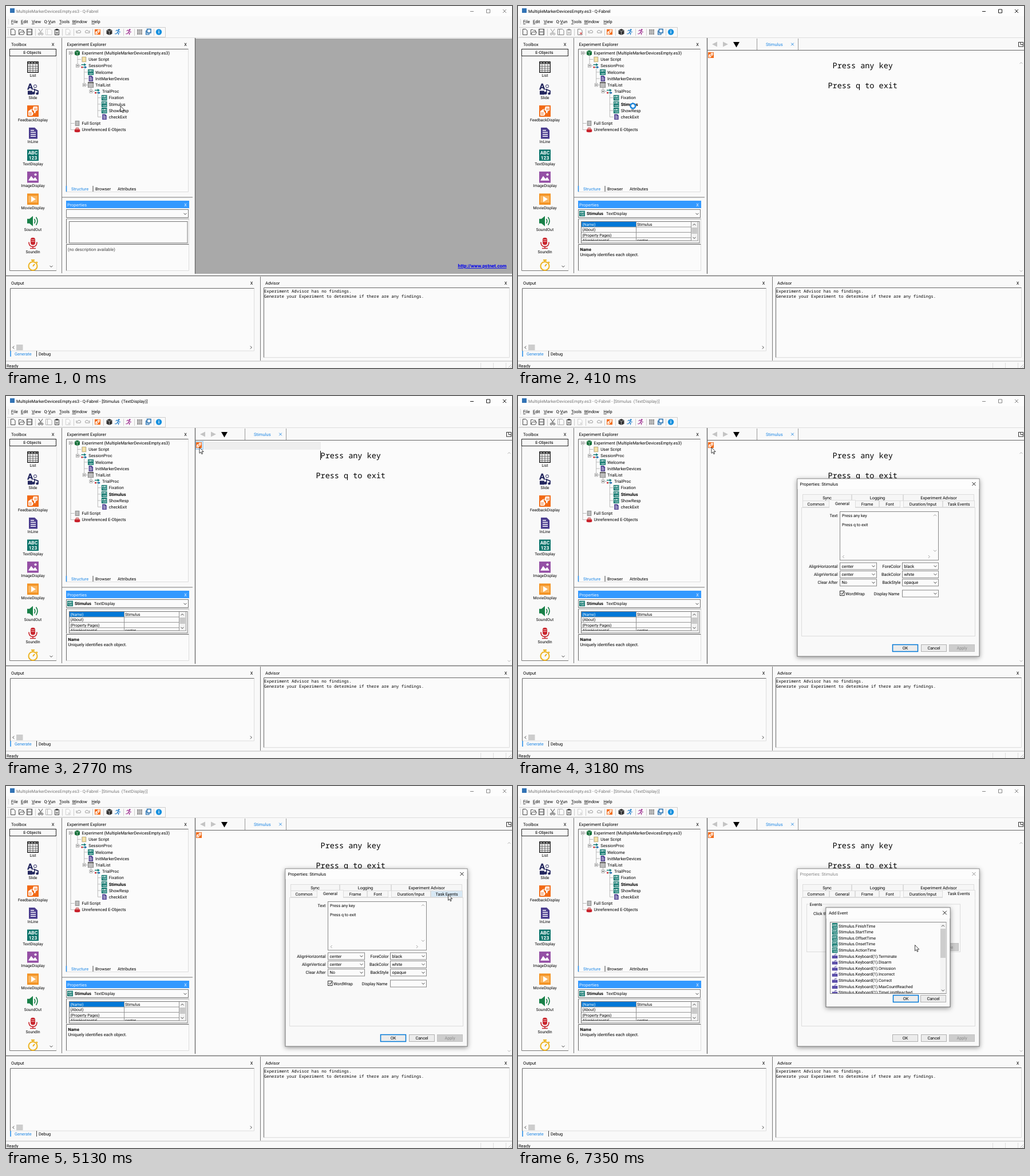
Write an HTML page that moves like this. It is 884x634 px and loops after 8000 ms.

```html
<!DOCTYPE html>
<html lang="en">
<head>
<meta charset="utf-8">
<title>Experiment editor</title>
<style>
  html, body { margin: 0; width: 100%; height: 100%; overflow: hidden; background: #f9f9f9; }
  svg { display: block; width: 884px; height: 634px; }
  text { font-family: Roboto, "Open Sans", sans-serif; text-rendering: geometricPrecision; white-space: pre; }
  .mono { font-family: "Noto Sans Mono", "DejaVu Sans Mono", monospace; }
  .bold { font-weight: 700; }
  .mid { text-anchor: middle; }
  .end { text-anchor: end; }
  .window { filter: drop-shadow(0 2px 4px #0006); }
</style>
</head>
<body>
<svg id="stage" viewBox="0 0 884 634">
<defs>
  <symbol id="list" viewBox="0 0 20 20"><path d="M.7 .7H19.3V19.3H.7Z" fill="#fff" stroke="#222" stroke-width="1.4"/><path d="M0 0H20V4.500H0Z" fill="#333"/><path d="M1 8.500H19M1 12H19M1 15.600H19M5 5V19M10 5V19M15 5V19" stroke="#555" stroke-width=".9"/><path d="M2 2.500H18" stroke="#fff" stroke-dasharray="3 2"/></symbol>
  <symbol id="slide" viewBox="0 0 20 20" fill="#25285f"><path d="M0 11 4 0H6.500L10.500 11H7.800L7 8.500H3.500L2.700 11ZM4.200 6.500H6.300L5.200 3Z"/><path d="M1 13H9V20H1Z"/><circle cx="14" cy="5" r="2.600" fill="none" stroke="#25285f"/><path d="M11 10 19 13V18" fill="none" stroke="#25285f" stroke-width="1.800"/><circle cx="11" cy="17" r="2.500"/><circle cx="17.500" cy="18" r="2.300"/><path d="M12 10H13.500V17H12Z"/></symbol>
  <symbol id="feedback" viewBox="0 0 20 20"><path d="M0 0H20V20H0Z" fill="#f26a16"/><path d="M2 10V18H9L11 14 8 10 8 6 5 8ZM11 2H18V9L15 10 14 14 12 13V10L9 8Z" fill="#fff"/><path d="M3 13H8M3 15.500H8M12 5H17M12 7.500H17" stroke="#f26a16"/></symbol>
  <symbol id="inline" viewBox="0 0 20 20"><path d="M3 0H13L18 5V20H3Z" fill="#4b3d8f"/><path d="M6 5H12M6 8.500H15M6 12H15M6 15.500H15" stroke="#fff" stroke-width="1.500"/></symbol>
  <symbol id="textd" viewBox="0 0 20 20"><path d="M0 0H20V20H0Z" fill="#08736a"/><text class="bold mid" x="10" y="9" font-size="8.500" fill="#fff">ABC</text><text class="bold mid" x="10" y="17.500" font-size="8.500" fill="#fff">123</text></symbol>
  <symbol id="image" viewBox="0 0 20 20"><path d="M0 0H20V20H0Z" fill="#9550a5"/><path d="M2 16 7 8 11 13 14 10 18 16Z" fill="#fff"/><circle cx="14.500" cy="5.500" r="2" fill="#fff"/></symbol>
  <symbol id="movie" viewBox="0 0 20 20"><path d="M0 0H20V20H0Z" fill="#f39324"/><path d="M2 4H18V16H2Z" fill="#fbb65f"/><path d="M7 5 15 10 7 15Z" fill="#fff"/></symbol>
  <symbol id="sound" viewBox="0 0 20 20"><path d="M0 6H4L10 1V19L4 14H0Z" fill="#188048"/><path d="M12.500 6Q15 10 12.500 14M15.500 3Q20.500 10 15.500 17" fill="none" stroke="#188048" stroke-width="1.700"/></symbol>
  <symbol id="mic" viewBox="0 0 20 20" fill="none" stroke="#c9252d" stroke-width="1.700"><rect x="6" y="0" width="8" height="13" rx="4" fill="#c9252d" stroke="none"/><path d="M3 8Q3 16 10 16T17 8M10 16V19M5 19.200H15"/><path d="M7 4H13M7 7H13" stroke="#fff" stroke-width=".7"/></symbol>
  <symbol id="wait" viewBox="0 0 20 20" fill="none" stroke="#edb21b" stroke-width="2"><circle cx="10" cy="11.500" r="7.500"/><path d="M7 1H13M10 1V4M10 12 13 8M16 4 18 6"/></symbol>
  <symbol id="cube" viewBox="0 0 20 20"><path d="M1 4 10 0 19 4V16L10 20 1 16Z" fill="currentColor"/><path d="M1 4 10 8 19 4M10 8V20" fill="none" stroke="#fff"/></symbol>
  <symbol id="script" viewBox="0 0 20 20"><path d="M3 1H17V19H3Z" fill="currentColor" stroke="#777"/><path d="M6 6H14M6 10H14M6 14H14" stroke="#fff"/></symbol>
  <symbol id="proc" viewBox="0 0 20 20"><path d="M0 6H11M7 15H14" stroke="#117a78" stroke-width="3"/><path d="M10 1 18 6 10 11Z" fill="#117a78"/><path d="M13 10 20 15 13 20Z" fill="#1b66b0"/><circle cx="3" cy="15" r="3" fill="#c9252d"/></symbol>
  <symbol id="bin" viewBox="0 0 20 20"><path d="M0 9H20V17Q10 21 0 17Z" fill="#c8202a"/><path d="M3 9 6 3H14L17 9Z" fill="#e9a0a0" stroke="#a11"/></symbol>
  <symbol id="keys" viewBox="0 0 20 20"><path d="M0 8H20V18H0Z" fill="#4b3d9f"/><path d="M10 8V4H15V1" fill="none" stroke="#4b3d9f" stroke-width="1.500"/><path d="M2 11H18M4 15H16" stroke="#b7b0e0" stroke-dasharray="2 1"/></symbol>
  <symbol id="runner" viewBox="0 0 20 20" fill="none" stroke="currentColor" stroke-width="2"><circle cx="14" cy="3" r="1.500" fill="currentColor"/><path d="M4 7 8 4 12 6 9 12 14 14 12 19M9 12 6 16H1M12 7 15 10H19"/></symbol>
</defs>
</svg>
<script>
const LOOP = 8000, INK = '#000', BLUE = '#1e87e5', PAPER = '#fbfbfb', FACE = '#f9f9f9';

const rect = (x1, y1, x2, y2, fill = 'none', stroke = 'none', w = 1) =>
  `<rect x="${x1}" y="${y1}" width="${x2 - x1}" height="${y2 - y1}" fill="${fill}" stroke="${stroke}" stroke-width="${w}"/>`;
const line = (d, stroke = '#666', w = 1, more = '') =>
  `<path d="${d}" fill="none" stroke="${stroke}" stroke-width="${w}" ${more}/>`;
const shape = (d, fill) => `<path d="${d}" fill="${fill}"/>`;
// Text is placed by the vertical centre of its capitals.
const text = (x, cy, str, size = 7.4, cls = '', fill = INK, more = '') =>
  `<text x="${x}" y="${(cy + size * .36).toFixed(2)}" font-size="${size}" class="${cls}" fill="${fill}" ${more}>${str}</text>`;
const icon = (id, cx, cy, size = 10, color = INK) =>
  `<use href="#${id}" x="${cx - size / 2}" y="${cy - size / 2}" width="${size}" height="${size}" color="${color}"/>`;
const span = (from, to, ...parts) => `<g data-from="${from}" data-to="${to}">${parts.join('')}</g>`;
const cross = (x, y, r = 3.3, color = INK) =>
  line(`M${x - r} ${y - r}L${x + r} ${y + r}M${x + r} ${y - r}L${x - r} ${y + r}`, color, .9);
const chevron = (x, y, angle = 0, color = '#333') =>
  line('M-2.500 -1.200 0 1.300 2.500 -1.200', color, .9, `transform="translate(${x} ${y}) rotate(${angle})"`);
const sunken = (x1, y1, x2, y2) =>
  rect(x1, y1, x2, y2, PAPER) + line(`M${x1} ${y2}H${x2}V${y1}`, '#ddd') + line(`M${x1} ${y2}V${y1}H${x2}`, '#666');
const button = (x1, y1, x2, y2, label, kind = '') => {
  const [fill, stroke, w] = {
    main: ['#ececec', '#0078d7', 1.5], off: ['#cdcdcd', '#c2c2c2', 1],
    hot: ['#e1eef9', '#0078d7', 1], down: ['#cce4f7', '#005499', 1]
  }[kind] || ['#ececec', '#b0b0b0', 1];
  return rect(x1 + .5, y1 + .5, x2 - .5, y2 - .5, fill, stroke, w) +
    text((x1 + x2) / 2, (y1 + y2) / 2 + .3, label, 7.3, 'mid', kind == 'off' ? '#8c8c8c' : INK);
};
const combo = (x1, x2, cy, value = '') =>
  rect(x1 + .5, cy - 6, x2 - .5, cy + 6, PAPER, '#888') + text(x1 + 3.5, cy, value) + chevron(x2 - 6, cy);

function titleBar() {
  const file = 'MultipleMarkerDevicesEmpty.es3 - Q-Fabrel';
  const open = file + ' - [Stimulus\u00a0 (TextDisplay)]';
  const head = (str, color) => text(18, 9, str, 7.45, '', color) +
    line('M811 9.500H817M839.500 6H845.500V12H839.500Z', color, .9) + cross(871, 9, 3, color);
  const menu = [['File', 9], ['Edit', 26], ['View', 45], ['Q-Vun', 66.5], ['Tools', 93], ['Window', 115.5], ['Help', 149.5]];
  return rect(0, 0, 884, 18, '#fdfdfd') + rect(7, 4, 15, 12, '#3273b5') +
    span(0, 280, head(file, '#777')) + span(280, 550, head(file, INK)) +
    span(550, 3180, head(open, INK)) + span(3180, LOOP, head(open, '#777')) +
    menu.map(([name, x]) => {
      const key = name.includes('-') ? 2 : 0;
      return text(x, 27.3, name.slice(0, key) + `<tspan text-decoration="underline">${name[key]}</tspan>` + name.slice(key + 1));
    }).join('') + line('M4.500 23V32M4.500 40V51', '#bbb', 1, 'stroke-dasharray="1 1"');
}

function toolbar() {
  const sheet = (x, color, fill = PAPER) => line(`M${x - 3.5} 40.500H${x + 1.5}L${x + 4} 43V50.500H${x - 3.5}Z`, color, .9, `style="fill:${fill}"`);
  const cut = c => line('M57 40 62 48M64 40 59 48', c) +
    `<circle cx="58" cy="49" r="1.700" fill="none" stroke="${c}"/><circle cx="63" cy="49" r="1.700" fill="none" stroke="${c}"/>`;
  const copy = c => sheet(73, c) + sheet(76, c);
  const paste = c => rect(85.5, 41.5, 92.5, 50.5, PAPER, c) + rect(87, 40, 91, 43, c) + line('M87 46H91M87 48H91', c);
  const remove = (c, x) => sheet(108, c) + cross(110, 48, 2, x);
  const edit = (a, b, c, d, x) => cut(a) + copy(b) + paste(c) + remove(d, x);
  const curl = (x, s) => line(`M${x - 4 * s} 47H${x + 3 * s}Q${x + 5 * s} 43 ${x} 42.500L${x - 3 * s} 45M${x - 4 * s} 43V47`, '#999');
  return line('M2 37.500H278.500V54.500H2', '#ccc') + line('M0 55.500H884', '#ddd') +
    [51.5, 98.5, 118.5, 151.5, 170.5, 205.5, 224.5, 258.5].map(x => line(`M${x} 40V52`, '#ccc')).join('') +
    sheet(12, '#333') +
    line('M22.500 50V41.500H26L27 42.500H30.500V45M22.500 50 25 45.500H32.500L30.500 50Z', '#444', .9) +
    rect(36.5, 40.5, 45.5, 50.5, '#aaa', '#444', .9) + rect(38.5, 41, 43.5, 44, '#fff') + rect(38.5, 46.5, 43.5, 50, '#eee') +
    span(0, 280, edit('#999', '#ccc', '#333', '#ccc', '#ccc')) +
    span(280, 550, edit('#999', '#777', '#999', '#777', '#d32020')) +
    span(550, LOOP, edit('#444', '#aaa', '#444', '#ccc', '#ccc')) +
    curl(127, 1) + curl(142, -1) +
    icon('feedback', 160, 45.5) + icon('cube', 180.5, 45.5, 11, '#333') + icon('runner', 195, 45.5, 11, '#1878c8') +
    icon('runner', 214, 45.5, 11, '#9b2a8d') +
    rect(229, 41, 238, 50, '#888') + line('M229 44H238M229 47H238M232 41V50M235 41V50', '#eee', .8) +
    rect(244.5, 43.5, 250, 50, '#cde', '#1565a9') + rect(246.5, 40.5, 253, 47, '#fff', '#1565a9', 1.4) +
    '<circle cx="267" cy="45.500" r="5.200" fill="#1590df"/>' + text(267, 45.5, 'i', 8, 'bold mid', '#fff');
}

function toolbox() {
  const items = ['list List', 'slide Slide', 'feedback FeedbackDisplay', 'inline InLine', 'textd TextDisplay',
    'image ImageDisplay', 'movie MovieDisplay', 'sound SoundOut', 'mic SoundIn', 'wait'];
  return text(9, 67, 'Toolbox', 7.5) + text(82, 67, 'X', 7.4, 'mid') +
    rect(6.5, 75.5, 87.5, 87.5, FACE, '#222') + text(46, 81.5, 'E-Objects', 7.4, 'mid') +
    line('M6.500 88V463.500H88', '#777') + line('M88.500 89V463', '#e4e4e4') +
    items.map((item, i) => {
      const [id, label = ''] = item.split(' '), y = 107 + i * 38.55;
      return icon(id, 47, y, 20) + text(47, y + 15, label, 6.9, 'mid');
    }).join('') + rect(7, 464, 88, 468, FACE) + chevron(79, 456) +
    line('M97.500 56V468', '#777');
}

function explorer() {
  const rows = [[0, 'cube', 'Experiment (MultipleMarkerDevicesEmpty.es3)', '#15703a'], [1, 'script', 'User Script', '#f0d890'],
    [1, 'proc', 'SessionProc'], [2, 'textd', 'Welcome'], [2, 'inline', 'InitMarkerDevices'], [2, 'list', 'TrialList'],
    [3, 'proc', 'TrialProc'], [4, 'textd', 'Fixation'], [4, 'textd', 'Stimulus'], [4, 'textd', 'ShowResp'],
    [4, 'inline', 'checkExit'], [0, 'script', 'Full Script', '#aaa'], [0, 'bin', 'Unreferenced E-Objects']];
  const rowY = i => 82.3 + i * 11.2;
  const expander = (x, i) => rect(x - 2.5, rowY(i) - 2.5, x + 2.5, rowY(i) + 2.5, PAPER, '#999', .8) + line(`M${x - 1.5} ${rowY(i)}h3`, INK, .8);
  const tree = rows.map(([level, id, label, color], i) => {
    const x = 124.5 + level * 11.8, y = rowY(i), tx = x + 8;
    const name = label == 'Stimulus'
      ? span(0, 410, text(tx, y, label)) + span(410, LOOP, text(tx, y, label, 7.5, 'bold'))
      : text(tx, y, label);
    return line(`M${x - 11.5} ${y}H${x - 5}`, '#aaa', .8) + icon(id, x, y, 10, color) + name;
  }).join('');
  return text(106.5, 67, 'Experiment Explorer', 7.7) + text(313.5, 67, 'X', 7.4, 'mid') +
    sunken(105.5, 75.5, 318.5, 325.5) +
    line('M113 82V217M125 87V105M136.700 109V139M148.500 143V150M160.300 154V194', '#aaa', .8) + tree +
    expander(113, 0) + expander(125, 2) + expander(136.7, 5) + expander(148.5, 6) +
    line('M105.500 315V325', BLUE, 1.5) + line('M152 315V325', '#444') +
    text(114, 320, 'Structure', 7.4, '', BLUE) + text(156, 320, 'Browser') + text(195, 320, 'Attributes') +
    line('M98 335H326', '#777');
}

function properties() {
  const cells = ['(Name)', '(About)', '(Property Pages)', 'AlignHorizontal'].map((name, i) =>
    text(112.5, 382.5 + i * 9.4, name, 6.8, '', i ? INK : '#fff')).join('');
  return rect(105, 341, 320, 354, '#3399ff') + text(107, 348, 'Properties', 7.4, '', '#eaf4ff') + text(313.5, 348, 'X', 7.4, 'mid', '#eaf4ff') +
    rect(105.5, 356.5, 318.5, 370.5, PAPER, '#777') + chevron(313, 364) +
    sunken(105.5, 373, 319.5, 416) + rect(106, 373.5, 319, 415.5, FACE) + sunken(105.5, 417.5, 319.5, 463.5) +
    rect(110.5, 377.5, 317, 415, PAPER, '#777') +
    span(0, 280, text(108, 426, '(no description available)', 7.4, '', '#444')) +
    span(280, LOOP,
      icon('textd', 112, 363.5) + text(120, 363.5, 'Stimulus', 7.3, 'bold') + text(154, 363.5, 'TextDisplay', 7.1),
      rect(110.5, 377.5, 314, 411, PAPER, '#777'), rect(111, 378, 206, 387, '#0078d7'),
      `<svg x="0" y="0" width="884" height="411">${cells}${text(208, 382.5, 'Stimulus', 6.8)}${text(208, 410.7, 'center', 6.8)}</svg>`,
      line('M111 387H302M111 396.400H302M111 405.800H302M206.500 378V411M302.500 378V411', '#888', .9),
      rect(303, 378, 313.5, 410.5, '#f3f3f3'), rect(303.5, 388, 313, 399, '#c9c9c9'), chevron(308, 383, 180), chevron(308, 406),
      text(108.5, 426, 'Name', 7.3, 'bold'), text(108.5, 435.5, 'Uniquely identifies each object.', 7.45));
}

function workspace() {
  return span(0, 410, rect(331, 57, 884, 469, '#a9a9a9'),
      text(874.5, 455, 'http://www.pstnet.com', 8.3, 'bold end', '#0000ee', 'text-decoration="underline"')) +
    span(410, LOOP, rect(331, 57, 884, 77, FACE), rect(331, 78, 884, 469, PAPER),
      line('M331 77.500H884', '#666'), line('M417.500 57V77M489.500 57V77', '#999'),
      shape('M348 62.500V71.500L339 67ZM358 62.500V71.500L367 67Z', '#c4c4c4'), shape('M376 63H387L381.500 72.500Z', '#000'),
      text(433, 67, 'Stimulus', 7.6, '', BLUE), cross(479.5, 67, 2.3, BLUE),
      rect(874.5, 63.5, 882.5, 71, PAPER, '#333'), line('M878 63.500V67.500H882', '#333'),
      chevron(879, 100, 180, '#aaa'), chevron(879, 464, 0, '#aaa')) +
    span(2090, 3180, rect(346, 80, 550, 94, '#eee'), rect(331.5, 79.5, 344.5, 93.5, '#cfe4f7', '#9cc8ee')) +
    span(410, LOOP, icon('feedback', 337, 86),
      text(602.2, 104, 'Press any key', 13.5, 'mono mid'), text(602.2, 139, 'Press q to exit', 13.5, 'mono mid')) +
    span(2650, 3180, line('M549.500 96V112', '#000')) + line('M330.500 56V469', '#666', 1.3);
}

function lowerPanels() {
  return line('M0 472.500H884', '#777', 1.5) + line('M444.500 474V621', '#777') +
    text(9, 485.7, 'Output', 7.5) + text(429, 485.5, 'X', 7.4, 'mid') + sunken(7.5, 494.5, 433.5, 604) +
    chevron(13, 598, 90) + rect(18, 593, 29.5, 603, '#cdcdcd') + chevron(428, 598, -90) +
    line('M8 604V614', BLUE, 1.5) + line('M53.500 604V614', '#444') +
    text(15, 609, 'Generate', 7.4, '', BLUE) + text(57, 609, 'Debug') +
    text(453, 485.7, 'Advisor', 7.5) + text(873, 485.5, 'X', 7.4, 'mid') + sunken(450.5, 493.5, 879.5, 615.5) +
    text(451, 499, 'Experiment Advisor has no findings.', 7.27, 'mono') +
    text(451, 508.5, 'Generate your Experiment to determine if there are any findings.', 7.27, 'mono') +
    line('M0 622H884', '#bbb') + text(1, 630.3, 'Ready', 7.5) +
    line('M829.500 625V634M851.500 625V634M873.500 625V634', '#ddd') + line('M878 633 883 628M881 634 884 631', '#bbb');
}

const TABS = { Sync: [493, 577, 173], Logging: [583, 673, 173], 'Experiment Advisor': [673, 797, 173],
  Common: [497, 544, 184], General: [544, 589, 184], Frame: [589, 631, 184], Font: [631, 668, 184],
  'Duration/Input': [673, 742, 184], 'Task Events': [742, 798, 184] };
TABS.Sync = [497, 583, 173];
const tab = (name, fill = '#f6f6f6') => {
  const [x1, x2, y] = TABS[name];
  return rect(x1 + .5, y - .5, x2 - .5, y + 10.5, fill, '#dcdcdc') +
    text((x1 + x2) / 2, y + 5.3, name, 7.35, 'mid');
};
const frontTab = name => {
  const [x1, x2] = TABS[name];
  return rect(x1 - .5, 182.5, x2 + .5, 197, FACE) + line(`M${x1 - .5} 196V182.500H${x2 + .5}V196`, '#dcdcdc') +
    text((x1 + x2) / 2, 188.3, name, 7.35, 'mid');
};

function generalPage() {
  const pair = (cy, a, av, b, bv) => text(558.5, cy, a, 7.35, 'end') + combo(562, 627, cy, av) +
    text(668.5, cy, b, 7.35, 'end') + combo(671, 735, cy, bv);
  return frontTab('General') + text(558.5, 209, 'Text', 7.35, 'end') + rect(562.5, 202.5, 734.5, 287.5, PAPER, '#888') +
    text(566, 209, 'Press any key', 7.2) + text(566, 225, 'Press q to exit', 7.2) +
    chevron(728.5, 209, 180, '#999') + chevron(728.5, 271, 0, '#999') + chevron(568.5, 281.5, 90, '#999') + chevron(718, 281.5, -90, '#999') +
    pair(298, 'AlignHorizontal', 'center', 'ForeColor', 'black') +
    pair(312.4, 'AlignVertical', 'center', 'BackColor', 'white') +
    pair(326.8, 'Clear After', 'No', 'BackStyle', 'opaque') +
    rect(562.5, 341.5, 570, 349.5, PAPER, '#333') + line('M564 345.500 566 347.500 569 343', INK) +
    text(572, 346, 'WordWrap', 7.3) + text(666.5, 346, 'Display Name', 7.3, 'end') + combo(671, 735, 346);
}

function taskPage() {
  const add = kind => button(676, 275, 722, 289, 'Add...', kind);
  const group = fill => rect(504.5, 207, 772.5, 290.5, 'none', '#dcdcdc') + rect(508, 204, 532, 210, fill);
  return frontTab('Task Events') +
    span(5580, 7350, rect(504, 198, 798, 354, '#eee'), group('#eee')) + span(7350, LOOP, group(FACE)) +
    text(509.5, 207, 'Events') + text(516, 223.3, 'Click the Add button to select the Event to listen for and invoke a Task', 7.27) +
    span(0, 6910, add()) + span(6910, 7190, add('hot')) + span(7190, LOOP, add('down')) +
    button(724, 275, 770, 289, 'Remove', 'off') +
    text(648, 350.3, 'Select an Event in the list above to edit its properties', 7.3, 'mid');
}

function propertiesDialog() {
  const head = color => text(492.5, 154.3, 'Properties: Stimulus', 7.4, '', color) + cross(796.5, 154, 3, color);
  const hover = (from, to, name) => span(from, to, tab(name, '#d8e8f4'));
  return span(3180, LOOP,
    `<g class="window">${rect(488, 145, 806, 456, FACE, '#777')}</g>`, rect(488.5, 145.5, 805.5, 163, '#fdfdfd'),
    span(0, 7350, head(INK)), span(7350, LOOP, head('#888')),
    Object.keys(TABS).map(name => tab(name)).join(''),
    rect(495.5, 195.5, 798.5, 420.5, FACE, '#dcdcdc'),
    hover(4300, 4450, 'Sync'), hover(4450, 4600, 'Logging'), hover(4600, 4730, 'Experiment Advisor'), hover(4730, 5580, 'Task Events'),
    span(0, 5580, generalPage()), span(5580, LOOP, taskPage()),
    span(0, 7350, button(654, 435, 699, 448, 'OK', 'main')), span(7350, LOOP, button(654, 435, 699, 448, 'OK')),
    button(704, 435, 749, 448, 'Cancel'), button(753, 435, 798, 448, 'Apply', 'off'));
}

function eventDialog() {
  const times = ['Finish', 'Start', 'Offset', 'Onset', 'Action'].map(s => ['textd', `Stimulus.${s}Time`]);
  const keys = ['Terminate', 'Disarm', 'Omission', 'Incorrect', 'Correct', 'MaxCountReached', 'TimeLimitReached']
    .map(s => ['keys', `Stimulus.Keyboard(1).${s}`]);
  const rows = [...times, ...keys].map(([id, label], i) =>
    icon(id, 553.5, 245 + i * 10.6) + text(560, 245 + i * 10.6, label, 7.1)).join('');
  return span(7350, LOOP,
    `<g class="window">${rect(538, 213, 755, 387, FACE, '#666')}</g>`, rect(538.5, 213.5, 754.5, 232, '#fdfdfd'),
    text(543, 222.3, 'Add Event'), cross(745.5, 222),
    rect(545.5, 238.5, 748, 363.5, PAPER, '#888'), `<svg x="0" y="0" width="884" height="363">${rows}</svg>`,
    rect(737.5, 239, 747.5, 363, '#f3f3f3'), rect(738, 250, 747, 301, '#cdcdcd'), chevron(742.5, 245, 180), chevron(742.5, 358),
    button(655, 366, 700, 379, 'OK', 'main'), button(703, 366, 748, 379, 'Cancel'));
}

const arrow = '<path d="M0 0V10.300L2.400 8.200 4 11.800 5.500 11.100 4 7.600H7.200Z" fill="#fff" stroke="#111" stroke-width=".8"/>';
const busy = '<circle cx=".8" cy="0" r="4.300" fill="#fff" stroke="#1c86dc" stroke-width="2.600"/>';

const stage = document.getElementById('stage');
stage.insertAdjacentHTML('beforeend', rect(0, 0, 884, 634, FACE) + titleBar() + toolbar() + toolbox() + explorer() +
  properties() + workspace() + lowerPanels() + propertiesDialog() + eventDialog() +
  `<g id="pointer">${span(0, 280, arrow)}${span(280, 830, busy)}${span(830, LOOP, arrow)}</g>`);

// The pointer jumps from one sampled position to the next: time, x, y.
const path = [[0, 200, 175], [970, 208, 174], [1090, 222, 173], [1210, 230.5, 173], [1520, 242, 170], [1670, 296, 134], [1800, 333.5, 102],
  [1940, 334.5, 95], [2090, 338, 90], [3720, 367, 123], [3880, 455, 160], [4010, 536, 191], [4300, 554, 178], [4450, 671, 178],
  [4600, 722, 179], [4730, 754, 183], [4860, 766, 186], [5000, 770, 188], [5130, 772.5, 190], [6395, 766, 206], [6520, 742, 237],
  [6645, 714, 266], [6770, 697, 278], [6910, 693.5, 278.5]];
const pointer = document.getElementById('pointer');
const spans = [...stage.querySelectorAll('[data-from]')].map(el => [el, +el.dataset.from, +el.dataset.to]);

function draw() {
  const t = performance.now() % LOOP;
  for (const [el, from, to] of spans) el.style.display = t >= from && t < to ? '' : 'none';
  const [, x, y] = path.findLast(([start]) => start <= t);
  pointer.setAttribute('transform', `translate(${x} ${y})`);
  requestAnimationFrame(draw);
}
draw();
</script>
</body>
</html>
```
